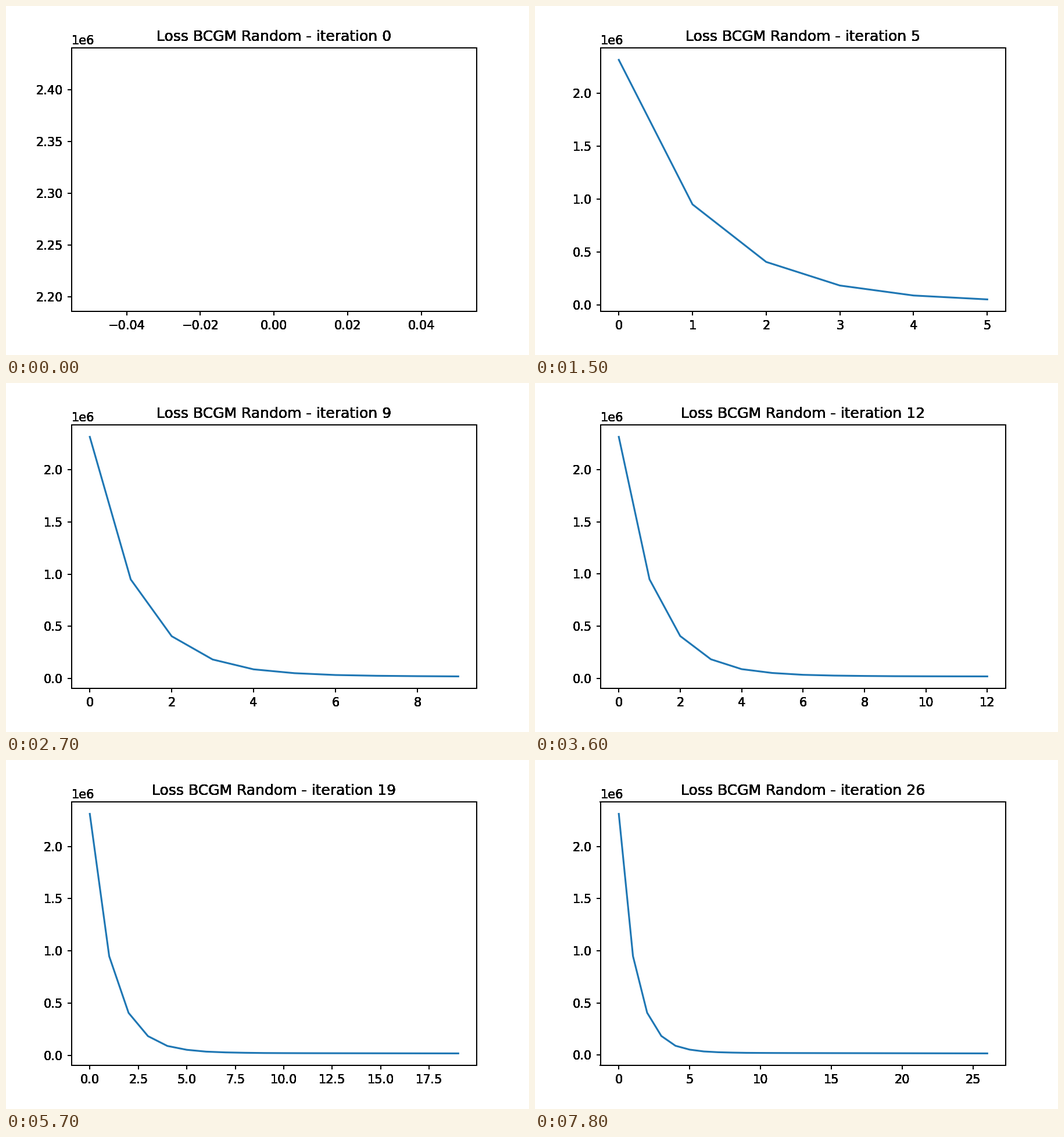
Write a matplotlib script that moves like this. It is 900x600 px and loops after 8 s.

```python
import matplotlib.pyplot as plt
import numpy as np
from matplotlib.animation import FuncAnimation
from matplotlib.axes import Axes

INTERVAL = 100          # ms per frame
FRAMES = 80
FRAMES_PER_ITERATION = 3
TEXT_PASSES = 8         # repeated drawing hardens the text edges

plt.rcParams.update({
    "font.family": "DejaVu Sans",
    "font.size": 10,
    "axes.linewidth": 0.96,
    "xtick.major.width": 0.96,
    "ytick.major.width": 0.96,
})


class HardTextAxes(Axes):
    """Axes whose labels have crisp, nearly aliased edges."""

    def draw(self, renderer):
        super().draw(renderer)
        labels = [self.title, self.yaxis.get_offset_text()]
        for axis, (low, high) in ((self.xaxis, self.get_xlim()),
                                  (self.yaxis, self.get_ylim())):
            labels += [tick.label1 for tick in axis.get_major_ticks()
                       if low <= tick.get_loc() <= high]
        for _ in range(TEXT_PASSES - 1):
            for label in labels:
                label.draw(renderer)


def loss_curve(count):
    """Steep early descent followed by a slow linear tail."""
    start = [2.3132, 0.949, 0.4057, 0.183, 0.0888, 0.052, 0.0345,
             0.0272, 0.0235, 0.0212, 0.0203, 0.0197, 0.0193]
    tail = start[-1] - 0.00025 * np.arange(1, count - len(start) + 1)
    return 1e6 * np.concatenate([start, tail])


losses = loss_curve(27)
fig = plt.figure(figsize=(6, 4), dpi=150, facecolor="white")
fig.subplots_adjust(left=0.125, right=0.9, bottom=0.125, top=0.88)
ax = fig.add_subplot(axes_class=HardTextAxes)


def update(frame):
    iteration = frame // FRAMES_PER_ITERATION
    ax.clear()
    ax.plot(losses[:iteration + 1], color="#1f77b4", linewidth=1.5)
    ax.set_title(f"Loss BCGM Random - iteration {iteration}")


animation = FuncAnimation(fig, update, frames=FRAMES, interval=INTERVAL,
                          repeat=True, repeat_delay=0)
plt.show()
```
